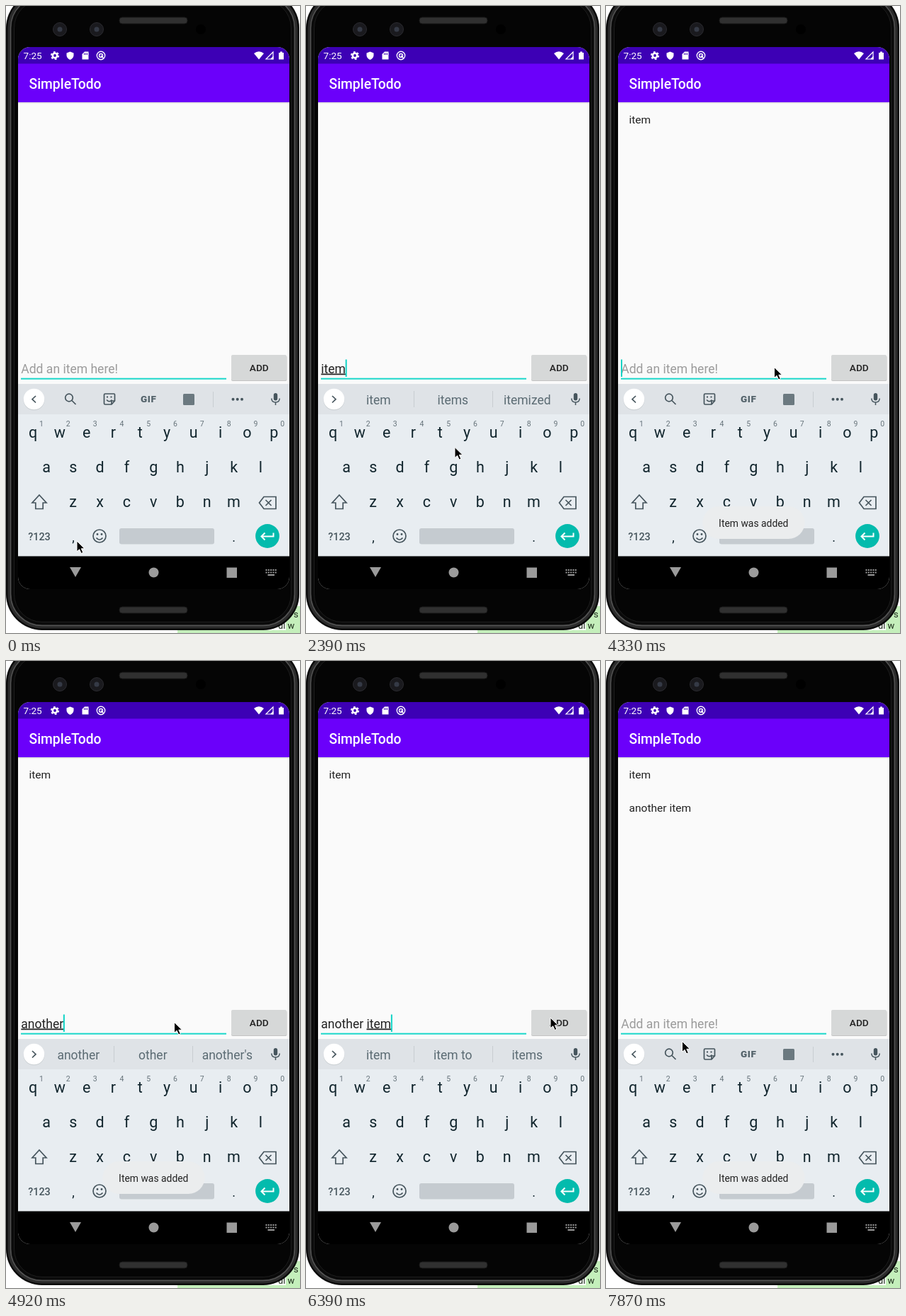
An HTML page for the animation above (8 s loop, 415 by 886 pixels).

```html
<!DOCTYPE html>
<html lang="en">
<head>
<meta charset="utf-8">
<title>Todo app demo</title>
<style>
html, body { margin: 0; width: 100%; height: 100%; overflow: hidden; background: #fff; }
svg { display: block; width: 415px; height: 886px; font-family: Roboto, sans-serif; }
text { white-space: pre; }
.mid { text-anchor: middle; }
.key { font-size: 21.5px; fill: #11252d; }
.dot { font-size: 18px; fill: #11252d; }
.num { font-size: 10.5px; fill: #66737a; }
.row { font-size: 15.55px; fill: #222; }
.field { font-size: 17.55px; fill: #222; }
.sug { font-size: 17.5px; fill: #5b6b73; }
.line { fill: none; stroke: #46555d; stroke-width: 1.7; }
.compose { text-decoration: underline; text-decoration-thickness: 1px; }
</style>
</head>
<body>
<svg viewBox="0 0 415 886">
  <!-- page behind the phone -->
  <rect width="415" height="886" fill="#fff"/>
  <path d="M242 882H395V848H415V886H242Z" fill="#c4efbb"/>
  <g font-size="13" fill="#1c2b1a"><text x="406" y="864">s</text><text x="384" y="880">ul w</text></g>

  <!-- phone -->
  <rect x="0" y="-20" width="414" height="902" rx="51" fill="#0a0a0a"/>
  <rect x="5" y="-15" width="404" height="892" rx="46" fill="none" stroke="#2b2b2b" stroke-width="5"/>
  <rect x="6.500" y="-13.500" width="401" height="889" rx="44.500" fill="none" stroke="#545454" stroke-width="1.300"/>
  <rect x="11.500" y="-8.500" width="391" height="879" rx="39.500" fill="#050505" stroke="#1e1e1e"/>
  <g fill="#303030" stroke="#191919">
    <rect x="160" y="16" width="96" height="9" rx="4"/>
    <rect x="160" y="849" width="96" height="9" rx="4"/>
  </g>
  <g fill="#1a1a1e" stroke="#2b2b30">
    <circle cx="76" cy="33" r="9.5"/><circle cx="128" cy="33" r="9.5"/>
  </g>
  <g fill="#353a46"><circle cx="76" cy="33" r="3.500"/><circle cx="128" cy="33" r="3.500"/></g>
  <circle cx="275" cy="33" r="7" fill="#000"/>

  <clipPath id="screen"><rect x="17" y="58" width="383" height="766" rx="17"/></clipPath>
  <g clip-path="url(#screen)">
    <rect x="17" y="58" width="383" height="766" fill="#fafafa"/>
    <rect x="17" y="136" width="383" height="1.500" fill="#dedede"/>
    <rect x="17" y="58" width="383" height="24" fill="#3d00b5"/>
    <rect x="17" y="81.500" width="383" height="54.500" fill="#6b00fa"/>
    <rect x="17" y="777" width="383" height="47"/>
  </g>

  <!-- status bar -->
  <g fill="#fff">
    <text x="24.5" y="75" font-size="13.6">7:25</text>
    <circle cx="69" cy="70" r="3.2" fill="none" stroke="#fff" stroke-width="2.6"/>
    <circle cx="69" cy="70" r="5.2" fill="none" stroke="#fff" stroke-width="1.8" stroke-dasharray="2.7 2.74"/>
    <path d="M90.500 64.500L95.500 66.500V70Q95 74 90.500 76Q86 74 85.500 70V66.500Z"/>
    <path d="M111 64.500H116.500V75.500H107.500V68Z"/>
    <path d="M110.500 66.500v2.500m2-2.500v2.500m2-2.500v2.500" stroke="#3d00b5"/>
    <g fill="none" stroke="#fff" stroke-width="1.4">
      <circle cx="134" cy="70" r="5.700"/><circle cx="134" cy="70" r="2.500"/><path d="M134 70l4 4"/>
    </g>
    <path d="M350 67Q357 61.500 364 67L357 75.500Z"/>
    <path d="M377 65V75H367Z" fill="none" stroke="#fff" stroke-width="1.2"/>
    <path d="M373 75L377.500 70.500V75.500Z"/>
    <path d="M385 66H387V64.500H390V66H392V75.500H385Z"/>
    <text x="32.500" y="117" font-size="19.300" font-weight="500">SimpleTodo</text>
  </g>

  <!-- list -->
  <text id="item1" class="row" x="32.500" y="165.500">item</text>
  <text id="item2" class="row" x="32.500" y="212.500">another item</text>

  <!-- input -->
  <text id="hint" class="field" x="21.300" y="518.500" style="fill:#9b9b9b">Add an item here!</text>
  <text class="field" x="21.300" y="518.500"><tspan id="done"></tspan><tspan id="word" class="compose"></tspan></text>
  <rect x="21" y="525.700" width="290" height="2" fill="#1bd8ca"/>
  <rect id="caret" y="499.500" width="2" height="24.500" fill="#10d3c5"/>
  <rect x="318" y="494" width="78.500" height="36" rx="2" fill="#c3c3c3"/>
  <rect id="add" x="318" y="493" width="78" height="36" rx="2"/>
  <text class="mid" x="357.300" y="516" font-size="13.700" font-weight="500" fill="#222">ADD</text>

  <!-- keyboard -->
  <rect x="17" y="534" width="383" height="43" fill="#dfe3e7"/>
  <rect x="17" y="577" width="383" height="200.500" fill="#e8edf1"/>
  <circle cx="39.500" cy="556.300" r="15" fill="#c9ced2"/>
  <circle cx="39.500" cy="555.500" r="14.800" fill="#fff"/>
  <path id="chevron" class="line"/>
  <g id="tools">
    <circle class="line" cx="89" cy="553.500" r="5.300"/><path class="line" d="M93 557.500l5.500 5.500"/>
    <path class="line" d="M140 548H152.500Q153.500 548 153.500 549V558L149 563H140Q138.500 563 138.500 561.500V549.500Q138.500 548 140 548ZM153 558H149V563"/>
    <path class="line" d="M142 556.500Q146 561 149.500 556.500" style="stroke-width:1.500"/>
    <path d="M142 551.500h2v2h-2zM147.500 551.500h2v2h-2z" fill="#46555d"/>
    <text class="mid" x="201.300" y="560" font-size="13.500" font-weight="900" letter-spacing=".6" fill="#53626a">GIF</text>
    <rect x="250" y="548" width="16" height="16" rx="1.500" fill="#6b7980"/>
    <path d="M292.500 545V567" stroke="#c8cdd1"/>
    <g fill="#46555d"><circle cx="320.500" cy="555.800" r="2"/><circle cx="326.700" cy="555.800" r="2"/><circle cx="333" cy="555.800" r="2"/></g>
  </g>
  <g id="sugs">
    <path d="M152.500 544V567M263.500 544V567" stroke="#c8cdd1"/>
    <text class="sug mid" x="102.300" y="562.500"></text>
    <text class="sug mid" x="207.300" y="562.500"></text>
    <text class="sug mid" x="312.300" y="562.500"></text>
  </g>
  <rect x="377.800" y="547" width="5.400" height="10.500" rx="2.700" fill="#46555d"/>
  <path class="line" d="M374.800 554.500Q375 560 380.500 560Q386 560 386.200 554.500M380.500 560V564" style="stroke-width:1.500"/>
  <g id="keys"></g>
  <path class="line" d="M47 691L57 702H52.200V710.500H41.800V702H37Z"/>
  <path class="line" d="M364 693.500H381V710.500H364L357.500 702ZM366.500 698l8 8m0-8l-8 8"/>
  <text class="mid" x="47" y="754.500" font-size="14.400" font-weight="500" fill="#46555d">?123</text>
  <text class="dot mid" x="95" y="756.500">,</text>
  <text class="dot mid" x="321.500" y="756.500">.</text>
  <circle class="line" cx="132" cy="749" r="9"/>
  <path class="line" d="M127.500 751.500Q132 757 136.500 751.500"/>
  <circle cx="129" cy="746.500" r="1.400" fill="#46555d"/><circle cx="135" cy="746.500" r="1.400" fill="#46555d"/>
  <rect x="160" y="738" width="134" height="22.500" rx="3" fill="#c5cbd0"/>
  <circle cx="369" cy="749" r="16.900" fill="#03bbad"/>
  <path d="M377.500 744.500V749.500H361M365.500 744.500L360.500 749.500L365.500 754.500" fill="none" stroke="#fff" stroke-width="2"/>

  <!-- navigation bar -->
  <g fill="#9b9b9b">
    <path d="M90 793H106L98 807Z"/>
    <circle cx="208.500" cy="800.500" r="7"/>
    <rect x="311.500" y="793.500" width="14.500" height="14.500"/>
  </g>
  <path d="M366.500 797H382M366.500 800.500H382" stroke="#9b9b9b" stroke-width="2" stroke-dasharray="2 1.300"/>
  <path d="M369.500 804H379" stroke="#9b9b9b" stroke-width="2"/>

  <g id="toast">
    <rect x="136.500" y="707" width="144" height="46" rx="23" fill="#ebedee"/>
    <text class="mid" x="208.300" y="735.500" font-size="13.900" fill="#222">Item was added</text>
  </g>
  <path id="mouse" d="M0 0V15L3.600 11.800L6.200 17.500L8.800 16.300L6.300 10.800H11Z" stroke="#fff" stroke-width="1" stroke-linejoin="round"/>
</svg>
<script>
const LOOP = 8000;
const $ = id => document.getElementById(id);

// Each track holds [start time, value...] steps.
const typing = [
  [0, '', ''], [1040, '', 'i'], [1120, '', 'it'], [1190, '', 'ite'], [1340, '', 'item'],
  [3280, '', ''], [4480, '', 'a'], [4630, '', 'ano'], [4780, '', 'anoth'], [4910, '', 'another'],
  [5060, 'another ', ''], [5360, 'another ', 'i'], [5650, 'another ', 'it'],
  [5800, 'another ', 'ite'], [5950, 'another ', 'item'], [6990, '', '']
];
const strip = [
  [0, 'tools'], [1040, 'I', 'in', 'is'], [1120, 'it', 'item', "it's"], [1190, 'item', 'items', 'ite'],
  [1340, 'item', 'items', 'itemized'], [3280, 'empty'], [3580, 'tools'],
  [4480, 'a', 'and', 'at'], [4630, 'another', 'ano', 'anon'],
  [4780, 'another', 'anoth', "another's"], [4910, 'another', 'other', "another's"],
  [5060, 'one', 'day', 'time'], [5360, 'I', 'in', 'is'], [5650, 'it', 'item', "it's"],
  [5800, 'item', 'items', 'ite'], [5950, 'item', 'item to', 'items'], [7140, 'empty'], [7440, 'tools']
];
const caret = [
  [0, 0], [450, 1], [900, 0], [1040, 1], [1790, 0], [2390, 1], [2990, 0], [3130, 1],
  [3880, 0], [4330, 1], [6540, 0], [6990, 1], [7590, 0]
];
const mouse = [
  [0, 100, 756], [2390, 210, 623.5], [2540, 295, 552], [2690, 338, 510], [2840, 347, 503.5],
  [3430, 337, 506], [3580, 262, 512], [3730, 237.500, 510.500],
  [6240, 270, 508], [6390, 345, 504], [6540, 371, 502.500],
  [7290, 362, 498], [7440, 290, 480], [7590, 185, 492], [7740, 122, 526], [7870, 107.500, 537.500]
];
const pressed = [[0, 0], [3130, 1], [3430, 0], [6840, 1], [7290, 0]];
const toast = [
  [0, 0], [3280, .25], [3430, .85], [3580, 1], [5360, .4], [5510, 0],
  [6990, .08], [7140, .75], [7290, 1]
];
const item1 = [[0, 0], [3280, .45], [3430, 1]];
const item2 = [[0, 0], [7140, 1]];

const at = (track, t) => track.findLast(step => step[0] <= t).slice(1);
const show = (id, on) => { $(id).style.opacity = +on; };

function buildKeys() {
  const rows = [['qwertyuiop', 38, 609.5], ['asdfghjkl', 57, 658.5], ['zxcvbnm', 94.7, 708]];
  const label = (cls, x, y, s) => `<text class="${cls} mid" x="${x}" y="${y}">${s}</text>`;
  $('keys').innerHTML = rows.map(([letters, x0, y], r) => [...letters].map((c, i) => {
    const x = x0 + 37.8 * i;
    return label('key', x, y, c) + (r ? '' : label('num', x + 12, 594, (i + 1) % 10));
  }).join('')).join('');
}

function draw(t) {
  const [done, word] = at(typing, t);
  $('done').textContent = done;
  $('word').textContent = word;
  show('hint', !done && !word);
  const width = done || word ? $('done').parentNode.getComputedTextLength() : 0;
  $('caret').setAttribute('x', 21 + width);
  show('caret', at(caret, t)[0]);

  const words = at(strip, t);
  const tools = words[0] === 'tools';
  show('tools', tools);
  show('sugs', words.length > 1);
  document.querySelectorAll('.sug').forEach((el, i) => { el.textContent = words[i] || ''; });
  $('chevron').setAttribute('d', tools ? 'M42 551L37 555.700L42 560.500' : 'M37 551L42 555.700L37 560.500');

  $('add').setAttribute('fill', at(pressed, t)[0] ? '#b9bbbb' : '#d6d8d8');
  show('toast', at(toast, t)[0]);
  show('item1', at(item1, t)[0]);
  show('item2', at(item2, t)[0]);
  $('mouse').setAttribute('transform', `translate(${at(mouse, t)})`);
}

function tick() {
  draw(performance.now() % LOOP);
  requestAnimationFrame(tick);
}

buildKeys();
tick();
</script>
</body>
</html>
```
